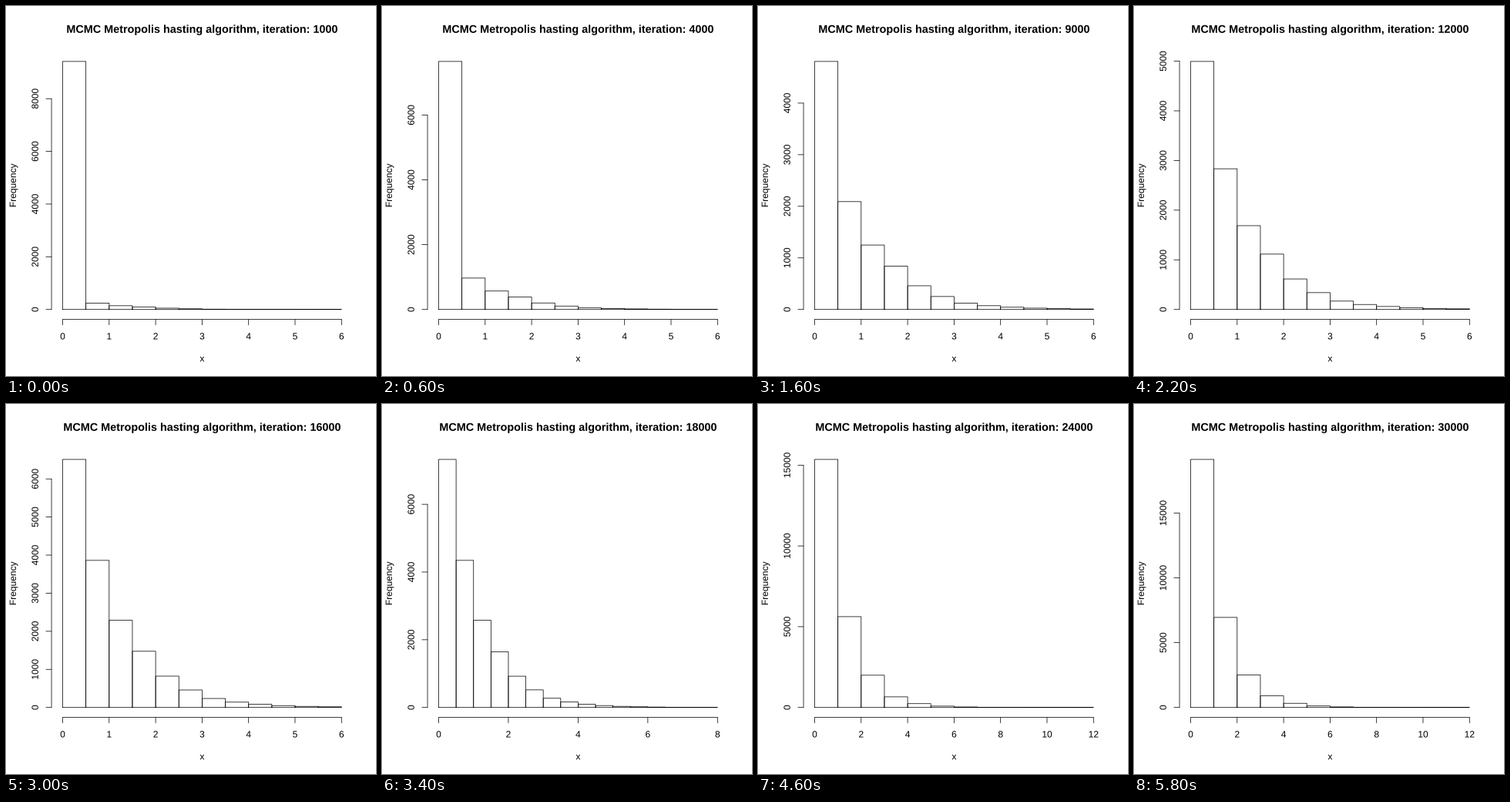
A matplotlib script that plays this animation: 480x480 px, repeating every 6 s.

```python
import numpy as np
import matplotlib
import matplotlib.pyplot as plt
from matplotlib.animation import FuncAnimation
from matplotlib.collections import LineCollection
from matplotlib.patches import PathPatch
from matplotlib.textpath import TextPath
from matplotlib.transforms import Affine2D

SIZE, DPI = 480, 72
FRAMES, INTERVAL = 30, 200
LINE = 14.4                                  # height of one margin line
LEFT, BOTTOM, RIGHT, TOP = 59.04, 406.56, 449.76, 59.04
MID_X, MID_Y = (LEFT + RIGHT) / 2, (TOP + BOTTOM) / 2
X0, X1 = 73.51, 435.29                       # data span inside the plot region
Y0, Y1 = 393.69, 71.91
START = 10                                   # thousands of zeros at the outset

matplotlib.rcParams["font.family"] = "Liberation Sans"

# Drift of the chain, keyed by thousands of iterations.
KNOTS = [4, 9, 16, 21, 24, 30]
RATE = [1.067, 1.03, 1.045, 1.045, 1.021, 1.016]
LINGER = [0, 0.035, 0, 0, 0, 0]              # extra weight close to zero


def survival(x, k):
    """Share of samples above x: an exponential tail with a slight bend."""
    hazard = np.interp(k, KNOTS, RATE) * x
    hazard += np.interp(k, KNOTS, LINGER) * (x > 0)
    hazard += (0.25 - 0.008 * k) * np.clip(x - 1.5, 0, 1.5)
    return np.exp(-hazard)


def histogram(k):
    """Return the upper x limit and the counts after k thousand iterations."""
    limit = 6 if k < 18 else 8 if k < 23 else 12
    width = 1 if limit == 12 else 0.5
    edges = np.arange(0, limit + width, width)
    counts = -1000 * k * np.diff(survival(edges, k))
    counts[0] += 1000 * max(0, START - k)
    return limit, counts


def ticks(top):
    """Round tick values for an axis from 0 to top with 4% padding."""
    cell = top * 1.08 / 5
    base = 10 ** np.floor(np.log10(cell))
    ratio = cell / base
    step = base * (1 if ratio < 1.556 else 2 if ratio < 3.111
                   else 5 if ratio < 7.778 else 10)
    return np.arange(0, top * 1.04, step)


fig = plt.figure(figsize=(SIZE / DPI, SIZE / DPI), dpi=DPI, facecolor="white")
ax = fig.add_axes([0, 0, 1, 1])
ax.set_xlim(0, SIZE)
ax.set_ylim(SIZE, 0)
ax.axis("off")

lines = LineCollection([], colors="black", linewidths=0.75, capstyle="round",
                       joinstyle="round", snap=False)
ax.add_collection(lines, autolim=False)
labels = []


def outline(text, size, weight):
    return TextPath((0, 0), text, size=size, prop={"weight": weight})


def write(x, y, text, angle=0, size=12, weight="normal"):
    """Place text by its baseline, centred on its advance width."""
    end = outline(text + "|", size, weight).get_extents().x1
    advance = end - outline("|", size, weight).get_extents().x1
    place = (Affine2D().translate(-advance / 2, 0).scale(1, -1)
             .rotate_deg(-angle).translate(x, y))
    path = place.transform_path(outline(text, size, weight))
    return ax.add_patch(PathPatch(path, facecolor="black", linewidth=0,
                                  snap=False))


write(MID_X, BOTTOM + 3.8 * LINE, "x")
write(LEFT - 3.2 * LINE, MID_Y, "Frequency", angle=90)


def draw(i):
    k = i + 1
    limit, counts = histogram(k)
    peak = counts.max()
    edges = np.linspace(X0, X1, len(counts) + 1)

    def to_x(v):
        return X0 + (X1 - X0) * v / limit

    def to_y(v):
        return Y0 + (Y1 - Y0) * v / peak

    segs = []
    for a, b, c in zip(edges, edges[1:], counts):
        y = to_y(c)
        segs.append([(a, Y0), (a, y), (b, y), (b, Y0), (a, Y0)])

    while labels:
        labels.pop().remove()
    labels.append(write(
        MID_X, 34.8, f"MCMC Metropolis hasting algorithm, iteration: {k}000",
        size=14.4, weight="bold"))

    xs, ys = ticks(limit), ticks(peak)
    segs.append([(X0, BOTTOM), (to_x(xs[-1]), BOTTOM)])
    for v in xs:
        x = to_x(v)
        segs.append([(x, BOTTOM), (x, BOTTOM + LINE / 2)])
        labels.append(write(x, BOTTOM + 1.8 * LINE, f"{v:.0f}"))

    segs.append([(LEFT, Y0), (LEFT, to_y(ys[-1]))])
    for v in ys:
        y = to_y(v)
        segs.append([(LEFT, y), (LEFT - LINE / 2, y)])
        labels.append(write(LEFT - 1.2 * LINE, y, f"{v:.0f}", angle=90))

    lines.set_segments(segs)
    return [lines, *labels]


anim = FuncAnimation(fig, draw, frames=FRAMES, interval=INTERVAL,
                     repeat=True, repeat_delay=0, blit=False)
plt.show()
```
